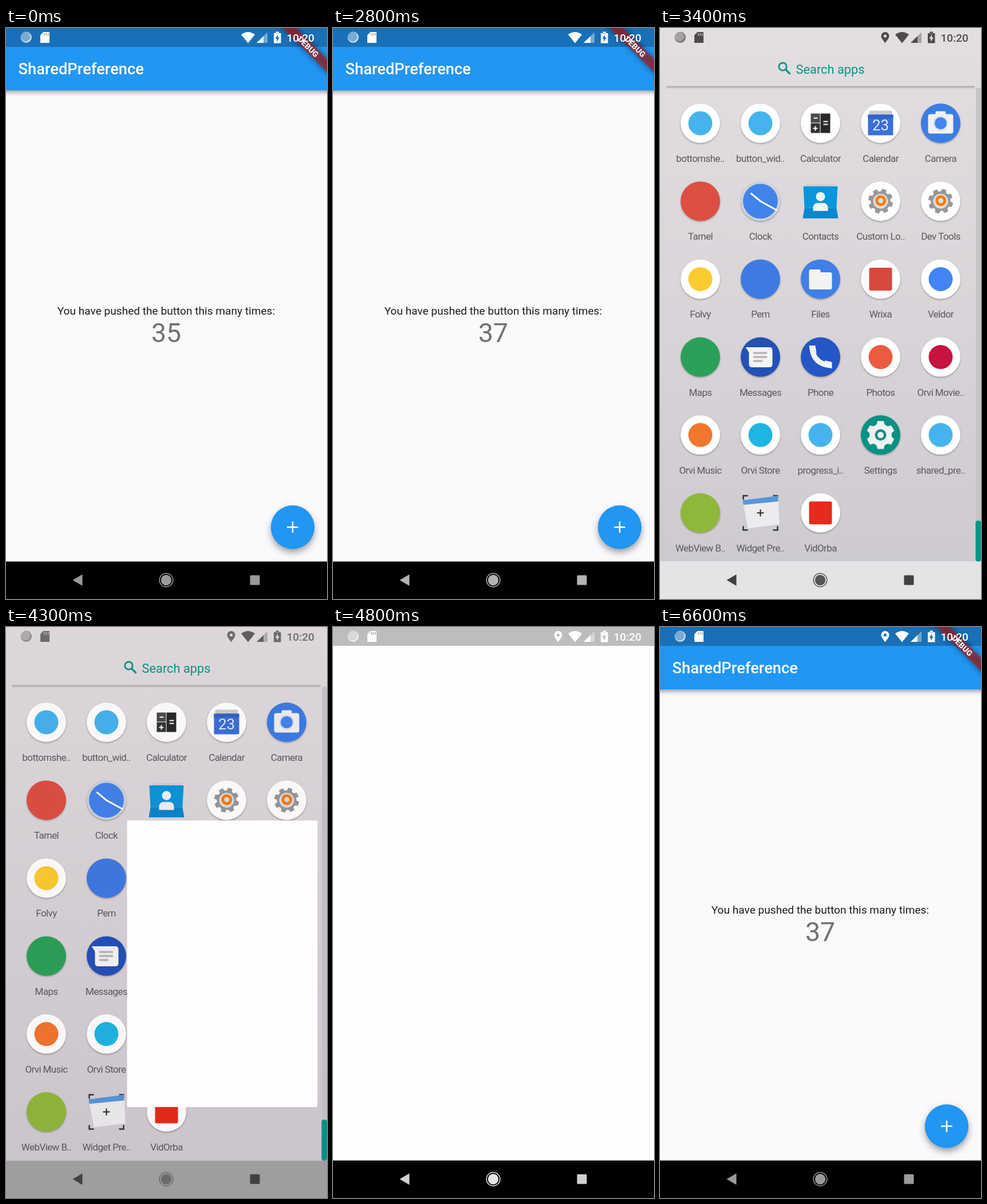
These frames come from a looping animation (561x998 px, 7.8 s). An HTML page with a canvas:

```html
<!DOCTYPE html>
<html lang="en">
<head>
<meta charset="utf-8">
<title>Counter demo</title>
<style>
html, body { margin: 0; width: 100%; height: 100%; overflow: hidden; background: #fffdff; }
canvas { display: block; width: 561px; height: 998px; }
</style>
</head>
<body>
<canvas id="stage" width="561" height="998"></canvas>
<script>
const W = 561, H = 998, LOOP = 7800, STEP = 100;
const BAR = 33, NAV = 932.5, DP = 1.365, WHITE = '#fffdff';
const c = document.getElementById('stage').getContext('2d');

// ---- helpers ----
const clamp = v => Math.min(1, Math.max(0, v));
const mix = (a, b, k) => a + (b - a) * k;
const ramp = (t, a, b) => clamp((t - a) / (b - a));
const grey = (v, a = 1) => `rgba(${v},${v},${v},${a})`;

function keyed(t, keys) {
  if (t <= keys[0][0]) return keys[0][1];
  for (let i = 1; i < keys.length; i++) {
    const [t0, v0] = keys[i - 1], [t1, v1] = keys[i];
    if (t <= t1) return Math.round(mix(v0, v1, ramp(t, t0, t1)));
  }
  return keys[keys.length - 1][1];
}

// cubic-bezier(.4, 0, .2, 1)
function fastOutSlowIn(x) {
  let lo = 0, hi = 1, s = 0.5;
  for (let i = 0; i < 24; i++) {
    s = (lo + hi) / 2;
    const bx = 1.2 * s * (1 - s) ** 2 + 0.6 * s * s * (1 - s) + s ** 3;
    if (bx < x) lo = s; else hi = s;
  }
  return 3 * s * s * (1 - s) + s ** 3;
}

function rect(x, y, w, h, color, r = 0) {
  c.fillStyle = color;
  c.beginPath();
  c.roundRect(x, y, w, h, r);
  c.fill();
}
function circle(x, y, r, color) {
  c.fillStyle = color;
  c.beginPath();
  c.arc(x, y, r, 0, Math.PI * 2);
  c.fill();
}
function ring(x, y, r, width, color) {
  c.strokeStyle = color;
  c.lineWidth = width;
  c.beginPath();
  c.arc(x, y, r, 0, Math.PI * 2);
  c.stroke();
}
function poly(points, color) {
  c.fillStyle = color;
  c.beginPath();
  points.forEach(([x, y]) => c.lineTo(x, y));
  c.closePath();
  c.fill();
}
function line(points, width, color) {
  c.strokeStyle = color;
  c.lineWidth = width;
  c.beginPath();
  points.forEach(([x, y], i) => i ? c.lineTo(x, y) : c.moveTo(x, y));
  c.stroke();
}
function text(str, x, y, size, color, weight = 400, align = 'left', spacing = 0) {
  c.font = `${weight} ${size}px Roboto, sans-serif`;
  c.textAlign = align;
  c.letterSpacing = spacing + 'px';
  c.fillStyle = color;
  c.fillText(str, x, y);
}
function shadow(color, blur, dy) {
  c.shadowColor = color;
  c.shadowBlur = blur;
  c.shadowOffsetY = dy;
}
const noShadow = () => shadow('transparent', 0, 0);

function gear(r, teeth, color, hole, holeColor) {
  const pts = [];
  for (let i = 0; i < teeth; i++) {
    const a = (i / teeth) * Math.PI * 2 - Math.PI / 2, s = Math.PI / teeth;
    for (const [da, k] of [[-0.7, 0.78], [-0.42, 1], [0.42, 1], [0.7, 0.78]])
      pts.push([Math.cos(a + da * s) * r * k, Math.sin(a + da * s) * r * k]);
  }
  poly(pts, color);
  circle(0, 0, hole, holeColor);
}

// ---- launcher icons, drawn around 0,0 ----
const R = 34.5;
function disc(color = '#fff') {
  shadow('rgba(0,0,0,.3)', 3, 1.5);
  circle(0, 0, R, color);
  noShadow();
}
const solid = color => () => disc(color);
const dot = color => () => { disc(); circle(0, 0, 21, color); };
const block = color => () => { disc(); rect(-20, -20, 40, 40, color, 3); };
const project = dot('#45b4ee');

function calculator() {
  disc();
  rect(-17, -17, 16, 16, '#4a4a4a');
  rect(-17, 0, 16, 17, '#333');
  rect(0, -17, 17, 34, '#282828');
  line([[-12, -9], [-5, -9]], 2, '#fff');
  line([[-13, 9], [-5, 9]], 2, '#fff');
  line([[-9, 5], [-9, 13]], 2, '#fff');
  line([[5, -3], [13, -3]], 2, '#fff');
  line([[5, 2], [13, 2]], 2, '#fff');
}
function calendar() {
  disc();
  rect(-20, -22, 40, 10, '#c9cbd0', 2);
  rect(-22, -15, 44, 36, '#3b6fd9', 2);
  rect(-22, -15, 44, 6, '#3262c4');
  text('23', 0, 12, 26, '#e3ebfa', 400, 'center');
}
function camera() {
  disc('#3b7de3');
  rect(-9, -21, 18, 12, '#f1f1f1', 2);
  rect(-22, -16, 44, 34, '#f1f1f1', 4);
  circle(0, 0, 13, '#d5dfee');
  circle(0, 0, 10.5, '#4285ec');
}
function clock() {
  disc('#ccd3da');
  circle(0, 0, 30.5, '#4283ea');
  line([[-17, -14], [0, 0], [29, 16]], 3, '#fff');
}
function contacts() {
  rect(-26, -30, 52, 8, '#cdd0d3', 2);
  poly([[-30, -26], [30, -26], [28, 12], [-28, 12]], '#0a96da');
  poly([[-28, 12], [28, 12], [31, 30], [-31, 30]], '#0a86cc');
  circle(0, -8, 8, '#eef3f6');
  rect(-13, 3, 26, 14, '#eef3f6', [8, 8, 0, 0]);
}
function tools() {
  disc();
  c.rotate(0.3);
  gear(22, 8, '#98989a', 13, '#dededf');
  ring(0, -1, 7, 5, '#ef7f1a');
}
function files() {
  disc('#3f80e8');
  rect(-20, -17, 20, 12, '#f3f3f3', 3);
  rect(-20, -12, 40, 30, '#f3f3f3', 3);
}
function messages() {
  disc('#2251b8');
  poly([[-26, -17], [-10, -17], [-18, -5]], '#f5f5f5');
  rect(-20, -17, 41, 35, '#f5f5f5', 5);
  [[-7, 25], [0, 25], [7, 17]].forEach(([y, w]) => rect(-13, y - 2, w, 4, '#b9bbbd', 2));
}
function phone() {
  disc('#2457c5');
  c.strokeStyle = '#f3f5f8';
  c.lineWidth = 9;
  c.beginPath();
  c.moveTo(-15, -18);
  c.quadraticCurveTo(-13, 12, 18, 15);
  c.stroke();
  poly([[-20, -20], [-9, -20], [-7, -7], [-17, -5]], '#f3f5f8');
  poly([[20, 20], [20, 9], [8, 6], [4, 16]], '#f3f5f8');
}
function settings() {
  disc('#0a9184');
  gear(25, 6, '#f0f0f0', 10, '#0a9184');
  circle(0, 0, 5.5, '#f0f0f0');
}
function preview() {
  for (const sx of [-1, 1]) for (const sy of [-1, 1])
    line([[22 * sx, 30 * sy], [30 * sx, 30 * sy], [30 * sx, 23 * sy]], 2.5, '#333');
  poly([[-31, -22], [31, -30], [33, 20], [-22, 27]], '#ececee');
  poly([[-31, -22], [31, -30], [31, -20], [-30, -14]], '#5b95d8');
  line([[-6, 0], [6, 0]], 2, '#222');
  line([[0, -6], [0, 6]], 2, '#222');
}

const apps = [
  ['bottomshe..', project], ['button_wid..', project], ['Calculator', calculator],
  ['Calendar', calendar], ['Camera', camera],
  ['Tarnel', solid('#dd4f43')], ['Clock', clock], ['Contacts', contacts],
  ['Custom Lo..', tools], ['Dev Tools', tools],
  ['Folvy', dot('#fccb2f')], ['Pem', solid('#3f7ae2')], ['Files', files],
  ['Wrixa', block('#d8483e')], ['Veldor', dot('#4285f4')],
  ['Maps', solid('#2ba05a')], ['Messages', messages], ['Phone', phone],
  ['Photos', dot('#ea5b3f')], ['Orvi Movie..', dot('#c8133f')],
  ['Orvi Music', dot('#f2762e')], ['Orvi Store', dot('#1fb5e2')], ['progress_i..', project],
  ['Settings', settings], ['shared_pre..', project],
  ['WebView B..', solid('#8fb83a')], ['Widget Pre..', preview], ['VidOrba', block('#e62a1b')]
];

// ---- screens ----
function drawer(shade) {
  const g = c.createLinearGradient(0, 0, 0, NAV);
  g.addColorStop(0, '#e2dee1');
  g.addColorStop(0.5, '#d9d5d9');
  g.addColorStop(1, '#cecbd0');
  rect(0, 0, W, NAV, g);
  rect(0, NAV, W, H - NAV, '#e6e3e6');

  ring(214.5, 67.5, 6.7, 2.8, '#0b9484');
  line([[219.5, 72.5], [227.5, 80.5]], 3.2, '#0b9484');
  text('Search apps', 237.5, 80, 21.84, '#0b9484');

  rect(11, 101.5, 539, 2.5, '#b3b0b2');
  rect(11, 104, 539, 2, 'rgba(0,0,0,.07)');
  rect(552, 104, 9, NAV - 104, '#c8c5c9', 4);
  rect(551.5, 861, 9.5, NAV - 861, '#079587', 4);

  apps.forEach(([name, icon], i) => {
    const x = 70.5 + 105 * (i % 5), y = 166.5 + 136.2 * Math.floor(i / 5);
    c.save();
    c.translate(x, y);
    icon();
    c.restore();
    text(name, x, y + 67.5, 17, '#5b595c', 400, 'center', -0.6);
  });
  if (shade) rect(0, 0, W, NAV, 'rgba(60,20,30,.03)');
}

function banner() {
  c.save();
  c.translate(W, 0);
  c.rotate(Math.PI / 4);
  const box = [-60 * DP, 28 * DP, 120 * DP, 12 * DP];
  c.filter = 'blur(5.4px)';
  rect(...box, 'rgba(0,0,0,.5)');
  c.filter = 'none';
  rect(...box, 'rgba(183,28,28,.627)');
  text('DEBUG', 0, 34 * DP + 5, 13.9, '#f4eef0', 900, 'center');
  c.restore();
}

function counterApp(dy, count, press) {
  c.save();
  c.translate(0, dy);
  c.beginPath();
  c.rect(0, 0, W, H);
  c.clip();
  rect(0, 0, W, H, '#fbf9fc');
  shadow('rgba(0,0,0,.42)', 8, 2.5);
  rect(-10, 0, W + 20, 109, '#2196f3');
  noShadow();
  rect(0, 0, W, BAR, '#1a70b6');
  text('SharedPreference', 21.5, 81, 27.3, '#fff', 500);
  text('You have pushed the button this many times:', 89.7, 500.5, 19.11, '#1d1c1e');
  text(count, 280, 549, 46.4, '#727073', 400, 'center');

  shadow('rgba(0,0,0,.36)', 12, 6);
  circle(501, 872.5, 38.2, '#2196f3');
  noShadow();
  if (press) circle(501, 872.5, 38.2, `rgba(188,188,188,${press})`);
  line([[491.2, 872.5], [510.8, 872.5]], 2.7, '#fff');
  line([[501, 862.7], [501, 882.3]], 2.7, '#fff');
  banner();
  c.restore();
}

function launchWindow(t) {
  const e = 1 - (1 - ramp(t, 4200, 4600)) ** 2.55;
  const k = clamp(e / 0.97);
  const w = mix(69, W, k), h = mix(69, NAV - BAR, e);
  rect(mix(490.5, W / 2, k) - w / 2, mix(711, (BAR + NAV) / 2, k) - h / 2, w, h, WHITE);
  const full = ramp(t, 4500, 4800);
  if (full) rect(0, 0, W, BAR, `rgba(190,188,190,${full})`);
}

// ---- system bars ----
function statusBar(tone, wifi, pin) {
  const ink = grey(tone);
  // dim disc with a brighter crescent at its lower right
  circle(34.3, 15.3, 8.3, grey(tone, 0.42));
  c.fillStyle = grey(tone, 0.8);
  c.beginPath();
  c.arc(35.2, 16.2, 9.6, 0, Math.PI * 2);
  c.arc(34.3, 15.3, 8.3, 0, Math.PI * 2);
  c.fill('evenodd');

  poly([[65.5, 7], [76, 7], [76, 26], [60, 26], [60, 12.5]], ink);
  for (const x of [66, 69.5, 73]) rect(x, 9, 1.7, 4.5, grey(tone > 128 ? 150 : 200, 0.8));

  if (pin) {
    c.fillStyle = ink;
    c.beginPath();
    c.moveTo(393.5, 26.5);
    c.bezierCurveTo(390, 21, 386.5, 18, 386.5, 14);
    c.arc(393.5, 14, 7, Math.PI, 0);
    c.bezierCurveTo(400.5, 18, 397, 21, 393.5, 26.5);
    c.arc(393.5, 14, 2.6, 0, Math.PI * 2);
    c.fill('evenodd');
  }

  c.fillStyle = grey(wifi);
  c.beginPath();
  c.moveTo(423, 26.5);
  c.lineTo(411, 11.5);
  c.quadraticCurveTo(423, 2.5, 435, 11.5);
  c.fill();

  poly([[457, 7.5], [457, 26], [438, 26]], grey(tone, 0.4));
  poly([[450, 14.3], [450, 26], [438, 26]], grey(wifi));

  c.fillStyle = ink;
  c.beginPath();
  c.rect(471.5, 6.5, 5.5, 3);
  c.rect(468, 9, 12.5, 17.5);
  [[475.2, 11.5], [470.5, 18.8], [473.3, 18.8], [473.3, 24], [478, 16.6], [475.2, 16.6]]
    .forEach(([x, y], i) => i ? c.lineTo(x, y) : c.moveTo(x, y));
  c.closePath();
  c.fill('evenodd');

  text('10:20', 490.5, 23.7, 19.1, ink, 500);
}

function navBar(tone, home, soft) {
  if (soft) shadow('rgba(0,0,0,.16)', 2, 0.5);
  poly([[116.5, 965], [133.5, 955], [133.5, 975]], grey(tone));
  circle(280, 965, 9.2, grey(home));
  rect(426.5, 956.5, 17, 17, grey(tone), 1.5);
  noShadow();
  ring(280, 965, 11.8, 1.5, grey(home));
}

// ---- timeline ----
const navKeys = (dark, mid) => [[2700, 154], [3100, 255], [3200, 255], [3400, dark], [4200, dark],
  [4500, mid], [4900, 255], [5200, 255], [6600, 154]];
const statusKeys = mid => [[3200, 255], [3400, 76], [4200, 76], [4500, mid], [4800, 255]];
const backKeys = navKeys(64, 68), homeKeys = navKeys(86, 150);
const inkKeys = statusKeys(170), wifiKeys = statusKeys(132);
const presses = [1600, 2100];
const HOME = 3151, TRAVEL = 1127, READY = 5900;

function render(t) {
  const count = 35 + presses.filter(p => t >= p).length;
  const press = presses.reduce((a, p) => t >= p ? 0.25 * (1 - ramp(t, p, p + 200)) : a, 0);
  const closing = t > HOME && t < 3400;
  c.clearRect(0, 0, W, H);

  if (t > HOME && t < READY) drawer(closing || t > 4200);
  if (t > 4200 && t < READY) launchWindow(t);
  if (t < 3400 || t >= READY) {
    const dy = closing ? fastOutSlowIn((t - HOME) / 300) * TRAVEL : 0;
    counterApp(dy, count, press);
  }
  if (!closing) {
    const dark = t < HOME ? 1 : 0.93 * ramp(t, 4200, 4500) + 0.07 * ramp(t, 4500, 4600);
    if (dark) rect(0, NAV, W, H - NAV, `rgba(0,0,0,${dark})`);
  }
  navBar(keyed(t, backKeys), keyed(t, homeKeys), closing);
  statusBar(keyed(t, inkKeys), keyed(t, wifiKeys), t >= 3000);
}

function tick(now) {
  render(Math.floor((now % LOOP) / STEP) * STEP);
  requestAnimationFrame(tick);
}
render(0);
requestAnimationFrame(tick);
</script>
</body>
</html>
```
